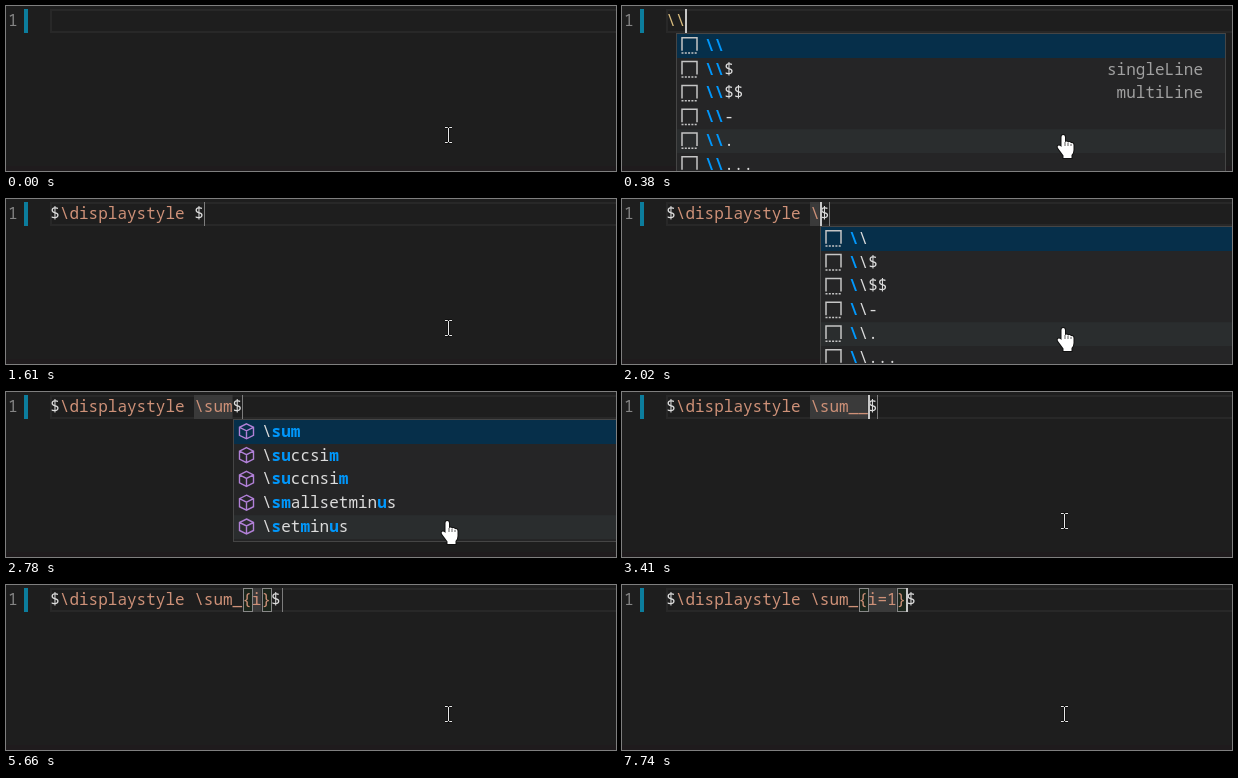
These frames come from a looping animation (610x165 px, 8000 ms). An HTML page with a canvas:

```html
<!DOCTYPE html>
<html>
<head>
<meta charset="utf-8">
<style>
  html, body { margin: 0; width: 100%; height: 100%; overflow: hidden; background: #1e1e1e; }
  canvas { display: block; }
</style>
</head>
<body>
<canvas id="stage" width="610" height="165"></canvas>
<script>
const ctx = document.getElementById('stage').getContext('2d');
const LOOP = 8000, CELL = 9.6, LEFT = 44.2, ROW = 23.8;
const FONT = '16px "Noto Sans Mono", monospace';
const STRING = '#ce9178', PLAIN = '#dcdcdc', ESCAPE = '#d7ba7d';

const SLASHES = ['\\\\', '\\\\$', '\\\\$$', '\\\\-', '\\\\.', '\\\\...', '\\\\:'];
const DETAILS = { '\\\\$': 'singleLine', '\\\\$$': 'multiLine' };
const S_WORDS = ['\\sim', '\\sum', '\\sup', '\\sin', '\\sec', '\\sqrt', '\\star'];
const SU_WORDS = ['\\sum', '\\sup', '\\subset', '\\succ', '\\supset', '\\succeq', '\\surd'];
const SUM_WORDS = ['\\sum', '\\succsim', '\\succnsim', '\\smallsetminus', '\\setminus'];
const SUBS = ['__', '_0', '_1', '_i', '_n', '_ij', '_k'];
const popup = (col, query, items, cube = false) => ({ col, query, items, cube });
const math = s => '$\\displaystyle ' + s + '$';

// Each step: start time, text, caret column (null while blinked off), suggestion list.
const steps = [
  [0, '', null],
  [230, '\\', 1],
  [300, '\\', 1, popup(1, '\\', SLASHES)],
  [380, '\\\\', 2, popup(1, '\\\\', SLASHES)],
  [690, '\\\\', null, popup(1, '\\\\', SLASHES)],
  [1000, '\\\\$', 3, popup(3, '\\\\$', SLASHES.slice(1, 3))],
  [1230, math(''), 15],
  [1610, math(''), null],
  [1940, math('\\'), 16],
  [2020, math('\\'), 16, popup(16, '\\', SLASHES)],
  [2150, math('\\s'), 17, popup(17, 's', S_WORDS, true)],
  [2320, math('\\su'), 18, popup(18, 'su', SU_WORDS, true)],
  [2400, math('\\sum'), 19, popup(19, 'sum', SUM_WORDS, true)],
  [2780, math('\\sum'), null, popup(19, 'sum', SUM_WORDS, true)],
  [3010, math('\\sum_'), 20, popup(20, '_', SUBS)],
  [3160, math('\\sum__'), 21, popup(20, '__', SUBS)],
  [3410, math('\\sum__'), 21],
  [3560, math('\\sum_{}'), 21],
  [3940, math('\\sum_{}'), null],
  [4320, math('\\sum_{}'), 21],
  [4730, math('\\sum_{}'), null],
  [5110, math('\\sum_{}'), 21],
  [5260, math('\\sum_{i}'), 22],
  [5660, math('\\sum_{i}'), null],
  [5810, math('\\sum_{i=}'), 23],
  [6110, math('\\sum_{i=}'), null],
  [6340, math('\\sum_{i=1}'), 24],
  [6740, math('\\sum_{i=1}'), null],
  [6970, math('\\sum_{i=1}'), 25],
  [7420, math('\\sum_{i=1}'), null],
  [7740, math('\\sum_{i=1}'), 25],
];

const colX = col => LEFT + col * CELL;
const innerX = col => Math.ceil(colX(col) + 0.5);

function rect(x, y, w, h, color) {
  ctx.fillStyle = color;
  ctx.fillRect(x, y, w, h);
}

function frame(x, y, w, h, color, width = 1) {
  ctx.strokeStyle = color;
  ctx.lineWidth = width;
  ctx.strokeRect(x + width / 2, y + width / 2, w - width, h - width);
}

function write(text, x, y, color, weight = 500) {
  ctx.font = weight + ' ' + FONT;
  ctx.fillStyle = color;
  ctx.fillText(text, x, y);
}

function stroke(path, color, width, dash = []) {
  ctx.strokeStyle = color;
  ctx.lineWidth = width;
  ctx.setLineDash(dash);
  ctx.stroke(new Path2D(path));
  ctx.setLineDash([]);
}

function drawEditor(text, caret) {
  rect(0, 0, 610, 165, '#1e1e1e');
  rect(0, 160, 610, 5, '#1f1b1d');
  frame(44, 3, 570, 24, '#282828', 2);
  write('1', 2, 20, '#858585', 400);
  rect(18, 3, 4, 24, '#0c7d9d');

  const open = text.indexOf('{'), close = text.indexOf('}');
  const isMath = text.startsWith('$');
  if (open > 0) {
    rect(innerX(open + 1), 3, colX(close) - innerX(open + 1), 24, '#3a3a3a');
    for (const col of [open, close]) {
      const x = Math.ceil(colX(col));
      rect(x, 3, 10, 24, '#1b251b');
      frame(x, 3, 10, 24, '#888888');
    }
  } else if (isMath && text.length > 16) {
    rect(188, 3, colX(text.length - 1) - 188, 24, '#3a3a3a');
  }
  if (isMath && text.length < 25) {
    const end = text.length;
    rect(open > 0 ? innerX(end) : Math.round(colX(end)), 3, 1, 24, '#7c7c7c');
  }

  [...text].forEach((ch, i) => {
    const color = ch === '$' ? PLAIN : isMath ? STRING : ESCAPE;
    write(ch, colX(i), 20, color);
  });

  if (caret !== null) {
    const inside = open > 0 && caret <= close;
    rect(inside ? innerX(caret) : Math.round(colX(caret)), 3, 2, 24, '#c8c8c8');
  }
}

// Positions of the query's letters, in order where possible.
function matches(query, item) {
  const found = new Set();
  let last = -1;
  for (const ch of query) {
    let at = item.indexOf(ch, last + 1);
    if (at < 0) at = item.indexOf(ch);
    if (at >= 0) found.add(last = at);
  }
  return found;
}

function drawIcon(x, y, cube) {
  ctx.save();
  ctx.translate(x, y);
  if (cube) {
    stroke('M0-7.5L7-4V4L0 7.5L-7 4V-4ZM-7-4L0-.5L7-4M0-.5V7.5', '#b180d7', 1.4);
  } else {
    stroke('M-7.5 5.5V-7.5H7.5V5.5', '#c5c5c5', 1.5);
    stroke('M-8 7.8H8.5', '#c5c5c5', 1.5, [2, 1.3]);
  }
  ctx.restore();
}

function drawPopup({ col, query, items, cube }) {
  const x = Math.round(colX(col)), height = Math.round(items.length * ROW) + 4;
  rect(x, 27, 550, height, '#252526');
  rect(x + 1, 28, 548, 24, '#062f4a');
  if (items.length > 4) rect(x + 1, 28 + 4 * ROW, 548, ROW, '#2a2d2e');
  frame(x, 27, 550, height, '#454545');
  items.forEach((item, row) => {
    const center = 39.3 + row * ROW, baseline = Math.round(center + 5.4);
    const hits = matches(query, item);
    drawIcon(x + 13.5, center, cube);
    [...item].forEach((ch, i) => {
      const hit = hits.has(i);
      write(ch, x + 29 + i * CELL, baseline, hit ? '#0097fb' : PLAIN, hit ? 700 : 500);
    });
    const detail = DETAILS[item] || '';
    write(detail, x + 527 - detail.length * CELL, baseline, '#a0a0a0');
  });
}

function drawPointer(hand) {
  if (hand) {
    const path = 'M439.5 141V131Q439.5 129 441.2 129T443 131V136Q445 134.6 446 136.4' +
      'Q448 135.4 449 137.2Q451.5 136.6 451.5 139V144Q451.5 147 449.5 149V152H441.5V149.5' +
      'L436 142Q435 139.6 437 139.4Q438.5 139.6 439.5 141Z';
    stroke(path, '#111', 2);
    ctx.fillStyle = '#fff';
    ctx.fill(new Path2D(path));
    stroke('M443 136V140M446 137V140M449 138V140', '#333', 0.8);
  } else {
    const path = 'M439 121.5H441.5L442.5 122.5L443.5 121.5H446M442.5 122V136' +
      'M439 136.5H441.5L442.5 135.5L443.5 136.5H446';
    stroke(path, '#111', 3);
    stroke(path, '#e8e8e8', 1);
  }
}

function draw(now) {
  const time = now % LOOP;
  const [, text, caret, list] = steps.findLast(step => step[0] <= time);
  drawEditor(text, caret);
  if (list) drawPopup(list);
  drawPointer(list && list.items.length > 4);
  requestAnimationFrame(() => draw(performance.now()));
}
draw(0);
</script>
</body>
</html>
```
